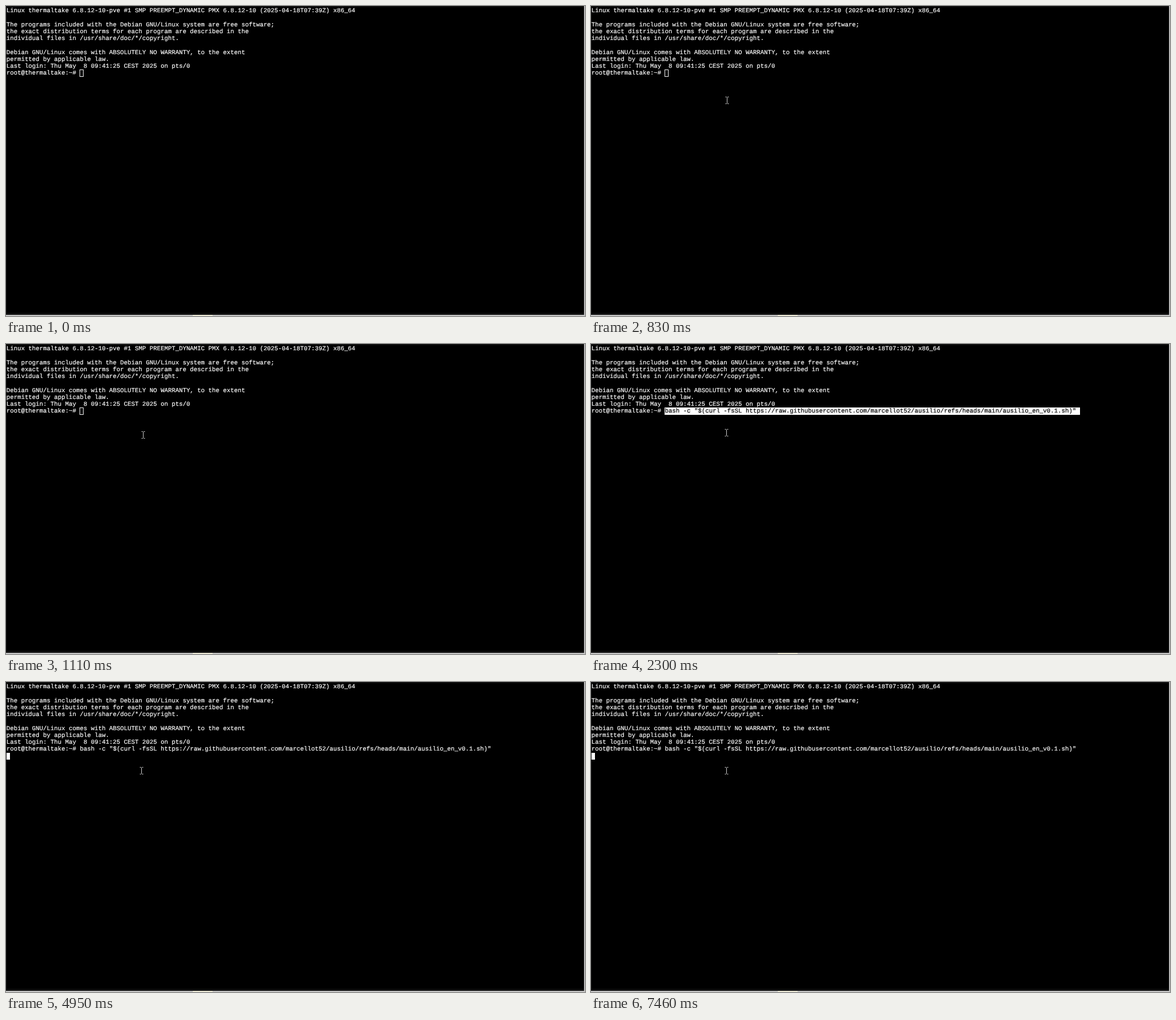
An HTML page that plays this animation: 1023x547 px, repeating every 8000 ms.

```html
<!DOCTYPE html>
<html lang="en">
<head>
<meta charset="utf-8">
<title>Terminal session</title>
<style>
  html, body { margin: 0; width: 100%; height: 100%; overflow: hidden; background: #000; }
  svg { display: block; width: 1023px; height: 547px; }
  text {
    font: 10.82px "Courier New", "Liberation Mono", monospace;
    white-space: pre;
    text-rendering: geometricPrecision;
    color: #fff;
    fill: currentColor;
    stroke: currentColor;
    stroke-width: 0.2;
  }
  #dialog text { color: #2e3436; }
  #dialog .title { color: #c00; }
  #dialog .active { color: #eeeeec; }
  #pasted text { color: #000; }
  .line { fill: none; stroke: #2e3436; stroke-width: 1; }
  #pointer { fill: none; stroke: #d0d0d0; stroke-width: 1; }
  #pointer.dim { stroke: #929aa2; }
</style>
</head>
<body>
<svg id="stage" viewBox="0 0 1023 547">
  <rect width="1023" height="547" fill="#101010"/>
  <rect x="1" y="2" width="1020" height="539.5"/>
  <rect y="545" width="1023" height="2" fill="#c6c6c6"/>
  <rect x="330" y="545" width="35" height="2" fill="#eeebd8"/>
  <rect x="1021.5" width="1.5" height="545" fill="#e0e0e0"/>
  <g id="shell"></g>
  <g id="hollow"></g>
  <g id="solid"></g>
  <g id="pasted"></g>
  <g id="running"></g>
  <g id="dialog"></g>
  <path id="pointer" d="M-3-6h2l1 1l1-1h2M0-5V5M-3 6h2l1-1l1 1h2"/>
</svg>
<script>
  const LOOP = 8000, CELL_W = 6.493, CELL_H = 12.25;
  const $ = id => document.getElementById(id);
  const colX = col => 0.7 + col * CELL_W;
  const rowY = row => 2 + row * CELL_H;

  // Cell backgrounds sit on whole pixels.
  const edgeX = col => Math.floor(1 + col * CELL_W);
  const edgeY = row => Math.round(rowY(row));

  function add(parent, tag, attrs, content = "") {
    const el = document.createElementNS("http://www.w3.org/2000/svg", tag);
    for (const key in attrs) el.setAttribute(key, attrs[key]);
    el.textContent = content;
    $(parent).append(el);
  }

  // Positions and sizes below are in character cells.
  const write = (parent, col, row, str, cls = "") =>
    add(parent, "text", { x: colX(col), y: rowY(row) + 9.2, class: cls }, str);
  const box = (parent, col, row, w, h, fill) =>
    add(parent, "rect", {
      x: edgeX(col), y: edgeY(row),
      width: edgeX(col + w) - edgeX(col), height: edgeY(row + h) - edgeY(row), fill
    });

  const command = 'bash -c "$(curl -fsSL https://raw.githubusercontent.com/marcellot52/ausilio/refs/heads/main/ausilio_en_v0.1.sh)"';
  const PROMPT = 20;

  [
    "Linux thermaltake 6.8.12-10-pve #1 SMP PREEMPT_DYNAMIC PMX 6.8.12-10 (2025-04-18T07:39Z) x86_64",
    "",
    "The programs included with the Debian GNU/Linux system are free software;",
    "the exact distribution terms for each program are described in the",
    "individual files in /usr/share/doc/*/copyright.",
    "",
    "Debian GNU/Linux comes with ABSOLUTELY NO WARRANTY, to the extent",
    "permitted by applicable law.",
    "Last login: Thu May  8 09:41:25 CEST 2025 on pts/0",
    "root@thermaltake:~#"
  ].forEach((str, row) => write("shell", 0, row, str));

  add("hollow", "rect", { x: 130.5, y: 112.5, width: 6, height: 12, fill: "none", stroke: "#fff" });
  box("solid", PROMPT, 9, 1, 1, "#fff");
  box("pasted", PROMPT, 9, command.length + 1, 1, "#fff");
  write("pasted", PROMPT, 9, command);
  write("running", PROMPT, 9, command);
  box("running", 0, 10, 1, 1, "#fff");

  add("dialog", "rect", { x: 1, y: 2, width: 1020, height: 539.5, fill: "#2a67a4" });
  box("dialog", 49, 18, 60, 10, "#2e3436");
  box("dialog", 48, 17, 60, 10, "#d3d7cf");
  add("dialog", "path", {
    class: "line",
    d: "M452.5 216.5H315.5V326.5H698.5V216.5H562.5M452.5 210.5V222.5M562.5 210.5V222.5"
  });
  write("dialog", 71, 17, "ARC VM Creator", "title");
  write("dialog", 50, 19, "This script will create a new Proxmox VM with the");
  write("dialog", 50, 20, "NovTerrium ARC image.");
  write("dialog", 50, 22, "Continue?");
  box("dialog", 64, 24, 5, 1, "#c00");
  write("dialog", 64, 24, "<Yes>", "active");
  write("dialog", 87, 24, "<No>");

  // The pointer sweeps in, then drifts to its resting place in 70 ms steps.
  const drift = [[240, 166], [240, 165], [239, 165], [242, 163], [242, 160], [240, 157], [239, 156]];
  function pointerAt(t) {
    const step = Math.floor((t - 200) / 70);
    if (step >= 9) return drift[Math.min(step - 9, drift.length - 1)];
    const left = Math.pow(1 - step / 9, 2.2);
    return [240 + Math.round(657 * left), 166 + Math.round(326 * left)];
  }

  const show = (id, on) => $(id).setAttribute("visibility", on ? "visible" : "hidden");

  function render(t) {
    const asking = t >= 5280 && t < 7460;
    show("shell", !asking);
    show("hollow", t < 1370);
    show("solid", t >= 1370 && t < 2300);
    show("pasted", t >= 2300 && t < 4950);
    show("running", t >= 4950 && !asking);
    show("dialog", asking);
    show("pointer", t >= 200);
    if (t >= 200) {
      const [x, y] = pointerAt(t);
      $("pointer").setAttribute("transform", `translate(${x + 0.5} ${y + 0.5})`);
    }
    $("pointer").classList.toggle("dim", asking);
  }

  const start = performance.now();
  function tick() {
    render((performance.now() - start) % LOOP);
    requestAnimationFrame(tick);
  }
  tick();
</script>
</body>
</html>
```
